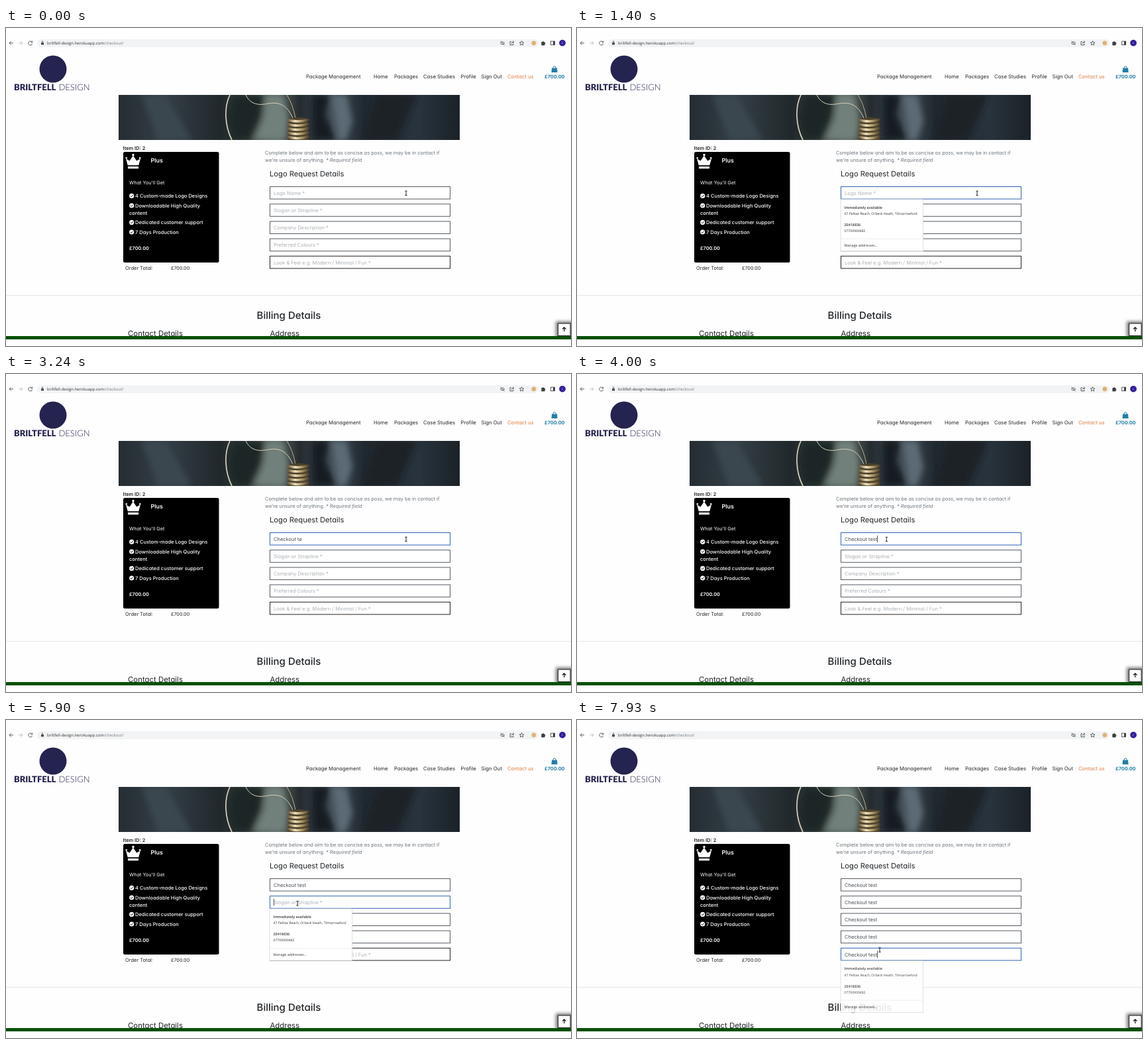
An HTML page that plays this animation: 853 px wide and 480 px high, repeating every 8 s.

```html
<!DOCTYPE html>
<html lang="en">
<head>
<meta charset="utf-8">
<title>Checkout form</title>
<style>
  html, body { margin: 0; width: 100%; height: 100%; overflow: hidden; background: #fefefe; }
  svg { display: block; width: 100vw; height: 100vh; }
  text { font-family: Inter, "Open Sans", sans-serif; font-feature-settings: "cv11"; text-rendering: geometricPrecision; white-space: pre; }
  .ui { font-family: "Open Sans", "Noto Sans", sans-serif; }
  .brand { font-family: Lato, sans-serif; }
</style>
</head>
<body>
<svg id="stage" viewBox="0 0 853 480">
  <defs>
    <linearGradient id="photo">
      <stop offset="0" stop-color="#252d33"/>
      <stop offset=".14" stop-color="#343e46"/>
      <stop offset=".3" stop-color="#20282b"/>
      <stop offset=".37" stop-color="#38413f"/>
      <stop offset=".46" stop-color="#59645f"/>
      <stop offset=".53" stop-color="#252c30"/>
      <stop offset=".63" stop-color="#414d57"/>
      <stop offset=".72" stop-color="#20282f"/>
      <stop offset=".88" stop-color="#28333d"/>
      <stop offset="1" stop-color="#1b2227"/>
    </linearGradient>
    <linearGradient id="brass">
      <stop offset="0" stop-color="#6d5c3d"/>
      <stop offset=".35" stop-color="#f0e3bd"/>
      <stop offset=".65" stop-color="#b39c68"/>
      <stop offset="1" stop-color="#4b412f"/>
    </linearGradient>
    <filter id="soft" x="-40%" y="-40%" width="180%" height="180%"><feGaussianBlur stdDeviation="4"/></filter>
    <filter id="glow" x="-60%" y="-60%" width="220%" height="220%"><feGaussianBlur stdDeviation="2.6"/></filter>
    <clipPath id="banner"><rect x="170" y="101" width="515" height="68"/></clipPath>
    <clipPath id="marked"><rect id="markClip" y="240" width="0" height="18"/></clipPath>
  </defs>
  <rect width="853" height="480" fill="#fefefe"/>

  <!-- browser bar -->
  <rect x="47" y="17" width="757" height="12" rx="6" fill="#f1f3f4"/>
  <g fill="none" stroke="#4a4d51" stroke-width=".9">
    <path d="M11 22.8H5M7.8 20L5 22.8l2.8 2.8"/>
    <path d="M19 22.8h6M22.2 20l2.8 2.8-2.8 2.8" stroke="#b9bcc0"/>
    <path d="M39.3 21.2a3 3 0 1 0 .4 2.4M39.8 19.5v2.2h-2.2"/>
    <path d="M746.3 22.8q3.2-4 6.4 0q-3.2 4-6.4 0M746.5 20l6 5.6"/>
    <path d="M763 20.6h-2v5h5v-2M763 23.6q.4-2.5 3.6-2.5M765 19.4l1.8 1.7-1.8 1.7"/>
    <path d="M778.5 19.5l1 2.2 2.3.2-1.8 1.6.6 2.3-2.1-1.2-2.1 1.2.6-2.3-1.8-1.6 2.3-.2z"/>
    <rect x="822.5" y="20" width="6" height="5.5"/>
  </g>
  <path d="M53 22h4v3.3h-4zM53.8 22v-1.2a1.2 1.2 0 0 1 2.4 0V22h-.6v-1.2a.6.6 0 0 0-1.2 0V22z" fill="#4a4d51"/>
  <path d="M826 20h2.5v5.5H826z" fill="#3c4043"/>
  <path d="M808.3 21h1.6a1 1 0 0 1 2 0h1.5v1.6a1 1 0 0 1 0 2v1.6h-5.1z" fill="#3c4043"/>
  <circle cx="796.8" cy="22.8" r="4.6" fill="#ecebe8"/>
  <circle cx="796.8" cy="22.8" r="3.2" fill="#e0b070"/>
  <circle cx="840" cy="22.6" r="4.9" fill="#35209a"/>

  <!-- brand and basket -->
  <circle cx="71" cy="62" r="20.5" fill="#25234f"/>
  <path d="M824 60.5h8l.5 6.5h-9z" fill="#247fa6"/>
  <path d="M826 62v-2.2a2 2 0 0 1 4 0V62" fill="none" stroke="#247fa6"/>

  <!-- banner photo -->
  <g clip-path="url(#banner)">
    <rect x="170" y="101" width="515" height="68" fill="url(#photo)"/>
    <g filter="url(#soft)">
      <path d="M345 101h45l-8 38-14 30h-25q-14-34 2-68z" fill="#1f2725"/>
      <path d="M392 101h26l8 34-4 34h-48l16-35z" fill="#71807a"/>
      <path d="M462 101h26l-7 30 18 38h-36z" fill="#161c20"/>
      <path d="M492 101h22l9 40-10 28h-12z" fill="#5b6a75"/>
      <path d="M205 101h35l40 68h-50z" fill="#3a4650"/>
      <path d="M560 101h60l-30 68h-50z" fill="#1a2127"/>
    </g>
    <g fill="none" stroke="#d9cfba">
      <path d="M338 101C329 120 330 147 341 169" stroke-width="1.7"/>
      <path d="M362 101C367 112 377 117 390 115S421 108 433 136" stroke-width="1"/>
      <path d="M424 101q9 14 13 35" stroke="#bfae88"/>
    </g>
    <path d="M428 137q13-5 27 0l2 32h-32z" fill="#4c412c"/>
    <g id="screw" fill="none" stroke="url(#brass)" stroke-width="3.6" stroke-linecap="round"></g>
  </g>

  <!-- package card -->
  <rect x="177" y="187" width="144.5" height="167" rx="2.5"/>
  <path d="M183.8 207.2L181 197.2l5.6 3.2 5.3-8 5.3 8 5.8-3.2-2.8 10zM184 209h16v3.2h-16z" fill="#fff"/>
  <g fill="#fff"><circle cx="192" cy="191.5" r="1.7"/><circle cx="181.8" cy="196.3" r="1.3"/><circle cx="202.2" cy="196.3" r="1.3"/></g>
  <g id="ticks"></g>

  <path d="M0 403.7h853" stroke="#e4e4e4"/>
  <g id="copy"></g>
  <g id="fields"></g>
  <rect id="mark" y="243.2" height="12" fill="#2f8cf0"/>
  <g id="markText" clip-path="url(#marked)"></g>
  <path id="caret" stroke="#222" stroke-width=".8"/>
  <g id="history"></g>
  <g id="address"></g>

  <!-- back to top -->
  <rect x="830" y="443" width="27" height="24" fill="#777" filter="url(#glow)"/>
  <rect x="833.5" y="446" width="18.5" height="18.5" fill="#fff" stroke="#222"/>
  <path d="M842.7 458v-6M840 454.5l2.7-2.7 2.7 2.7" fill="none" stroke="#111" stroke-width="1.2"/>
  <rect y="465" width="853" height="5" fill="#075007"/>
  <rect y="470" width="853" height="10" fill="#fefefe"/>

  <path id="arrow" d="M0 0v8l1.9-1.7 1.4 3 1.3-.6-1.4-2.9h2.5z" fill="#fff" stroke="#222" stroke-width=".7"/>
  <path id="beam" d="M-1.6-3.2h3.2M-1.6 3.2h3.2M0-3.2v6.4" fill="none" stroke="#111" stroke-width=".9"/>
</svg>
<script>
const NS = "http://www.w3.org/2000/svg";
const $ = id => document.getElementById(id);
const set = (el, attrs) => { for (const k in attrs) el.setAttribute(k, attrs[k]); return el; };
const add = (parent, tag, attrs) => parent.appendChild(set(document.createElementNS(NS, tag), attrs));
const text = (parent, x, y, str, size, fill = "#212529", weight = 400, extra = {}) => {
  const el = add(parent, "text", { x, y, "font-size": size, fill, "font-weight": weight, ...extra });
  el.textContent = str;
  return el;
};
const span = (el, str, attrs) => { add(el, "tspan", attrs).textContent = str; };

const LOOP = 8000, ANSWER = "Checkout test";
const UI = { class: "ui" };
const copy = $("copy");

// Static lettering
const url = text(copy, 62, 25, "briltfell-design.herokuapp.com", 6, "#303236", 400, UI);
span(url, "/checkout/", { fill: "#777b80" });
text(copy, 838.7, 24.2, "c", 4.5, "#d8d4f4", 400, UI);
const brand = text(copy, 12, 94, "", 13, "#25234f", 900, { class: "brand" });
span(brand, "BRILTFELL", {});
span(brand, "DESIGN", { dx: 4, "font-weight": 300 });

[[453, "Package Management"], [555, "Home"], [586, "Packages"], [630, "Case Studies"],
 [686.5, "Profile"], [717.5, "Sign Out"], [757, "Contact us", "#dc7c3e"]]
  .forEach(([x, s, fill]) => text(copy, x, 75.6, s, 7.7, fill));
text(copy, 813, 75.6, "£700.00", 7.3, "#247fa6", 700);

text(copy, 176.5, 184, "Item ID: 2", 7.4, "#212529", 600);
text(copy, 218.5, 203.2, "Plus", 8.9, "#fff", 600);
text(copy, 186, 236, "What You'll Get", 7.3, "#fff");
[[256, "4 Custom-made Logo Designs"], [270.6, "Downloadable High Quality"],
 [296, "Dedicated customer support"], [310.6, "7 Days Production"]].forEach(([y, s]) => {
  text(copy, 195, y, s, 7.5, "#fff", 500);
  add($("ticks"), "circle", { cx: 189.7, cy: y - 2.6, r: 3.6, fill: "#fff" });
  add($("ticks"), "path", { d: `M187.8 ${y - 2.6}l1.4 1.4 2.6-2.6`, fill: "none", stroke: "#000" });
});
text(copy, 186, 281.6, "content", 7.5, "#fff", 500);
text(copy, 186, 335.2, "£700.00", 7.3, "#fff", 600);
text(copy, 180, 365, "Order Total:", 7.5);
text(copy, 249, 365, "£700.00", 7.2);

text(copy, 391, 191.4, "Complete below and aim to be as concise as poss, we may be in contact if", 7.45, "#6c757d");
const note = text(copy, 391, 202, "we're unsure of anything. ", 7.45, "#6c757d");
span(note, "* Required field", { "font-style": "italic" });
text(copy, 398, 224.2, "Logo Request Details", 11.2);
text(copy, 427, 438.8, "Billing Details", 15, "#212529", 500, { "text-anchor": "middle" });
text(copy, 184, 465, "Contact Details", 11.4);
text(copy, 398.5, 465, "Address", 11.4);

for (let y = 139; y < 172; y += 6.4)
  add($("screw"), "path", { d: `M426 ${y}q15 4 30.5-.6` });

// Form fields
const fieldTop = i => 239.5 + 26.2 * i;
const fields = ["Logo Name *", "Slogan or Strapline *", "Company Description *", "Preferred Colours *",
  "Look & Feel e.g. Modern / Minimal / Fun *"].map((hint, i) => ({
    hint,
    box: add($("fields"), "rect", { x: 398.5, y: fieldTop(i), width: 272, height: 18.6, fill: "#fff" }),
    label: text($("fields"), 404, fieldTop(i) + 12.3, "", 7.5)
  }));
const markLabel = text($("markText"), 404, fieldTop(0) + 12.3, ANSWER, 7.5, "#fff");

// Suggestion popups
const popup = (group, width, height) => add(group, "rect",
  { x: 398, y: 0, width, height, fill: "#fff", stroke: "#d4d7da", "stroke-width": .8 });
popup($("history"), 87, 104.5);
["Checkyouty", "check", "Check", "check bag 3 remove", "Check change", "check error message"]
  .forEach((s, i) => text($("history"), 403.5, 13.8 + 16.2 * i, s, 5.4, "#222", 400, UI));
popup($("address"), 124.5, 78);
[[13.8, "Immediately available", 5.4, 600], [23, "47 Pellow Reach, Orbeck Heath, Tilmarrowford", 5.1],
 [40, "20418836", 5.4, 600], [49, "07700900482", 5.1], [71, "Manage addresses...", 5.3]]
  .forEach(([y, s, size, weight]) => text($("address"), 403.5, y, s, size, "#333", weight, UI));
add($("address"), "path", { d: "M398 59.5h124.5", stroke: "#e6e8ea", "stroke-width": .7 });

// Timing
const focusAt = [450, 5550, 6350, 7050, 7600];
const pasteAt = [0, 5950, 6700, 7330, 7915];
const TYPE_FROM = 1650, KEY = 153, FADE = 150, DRAG = 4100;
const mouse = [[0, 604, 249.3], [3650, 604, 249.3], [4080, 454, 249.5], [4600, 350.5, 246], [5150, 350.5, 246],
  [5500, 440, 276], [6050, 440, 277], [6320, 459, 301], [6560, 459, 302], [6790, 459, 313],
  [7020, 457, 328], [7380, 457, 329], [7580, 457, 351], [7930, 457, 347]];

const clamp = (v, a, b) => Math.min(b, Math.max(a, v));
const show = (el, on) => set(el, { visibility: on ? "visible" : "hidden" });

function mouseAt(t) {
  const n = mouse.findIndex(k => k[0] > t);
  if (n < 0) return mouse[mouse.length - 1].slice(1);
  const [a, b] = [mouse[n - 1], mouse[n]];
  const p = (t - a[0]) / (b[0] - a[0]), e = p * p * (3 - 2 * p);
  return [a[1] + (b[1] - a[1]) * e, a[2] + (b[2] - a[2]) * e];
}

function render(t) {
  const typed = clamp(Math.floor((t - TYPE_FROM) / KEY) + 1, 0, ANSWER.length);
  const active = focusAt.filter(f => t >= f).length - 1;

  fields.forEach((f, i) => {
    const value = i ? (t >= pasteAt[i] ? ANSWER : "") : ANSWER.slice(0, typed);
    f.label.textContent = value || f.hint;
    set(f.label, { fill: value ? "#495057" : "#aab0b6" });
    set(f.box, { stroke: i === active ? "#2f62b5" : i === 4 ? "#222" : "#555b63" });
    f.end = 404 + (value ? f.label.getComputedTextLength() : 0);
  });

  const [x, y] = mouseAt(t);
  const row = Math.floor((y - fieldTop(0)) / 26.2);
  const over = x > 398 && x < 671 && row >= 0 && y < fieldTop(row) + 18.6;
  show($("beam"), over);
  show($("arrow"), !over);
  const at = { transform: `translate(${x} ${y})` };
  set($("beam"), at);
  set($("arrow"), at);

  const marking = t >= DRAG && t < focusAt[1];
  const end = 404 + markLabel.getComputedTextLength();
  const left = t < 4600 ? clamp(x, 404, end) : 404;
  const span = { x: left, width: marking ? end - left : 0 };
  set($("mark"), span);
  set($("markClip"), span);

  const blink = (t + 365) % 1000 < 530;
  show($("caret"), active >= 0 && !marking && blink);
  if (active >= 0) set($("caret"), { d: `M${fields[active].end + .4} ${fieldTop(active) + 4.2}v10.4` });

  show($("history"), typed > 0 && typed < 6);
  set($("history"), { transform: `translate(0 ${fieldTop(0) + 19.3})` });
  const closeAt = active > 0 ? pasteAt[active] : TYPE_FROM;
  set($("address"), {
    opacity: active < 0 ? 0 : clamp(1 - (t - closeAt) / FADE, 0, 1),
    transform: `translate(0 ${fieldTop(Math.max(active, 0)) + 19.3})`
  });
}

const start = performance.now();
(function tick() {
  render((performance.now() - start) % LOOP);
  requestAnimationFrame(tick);
})();
</script>
</body>
</html>
```
